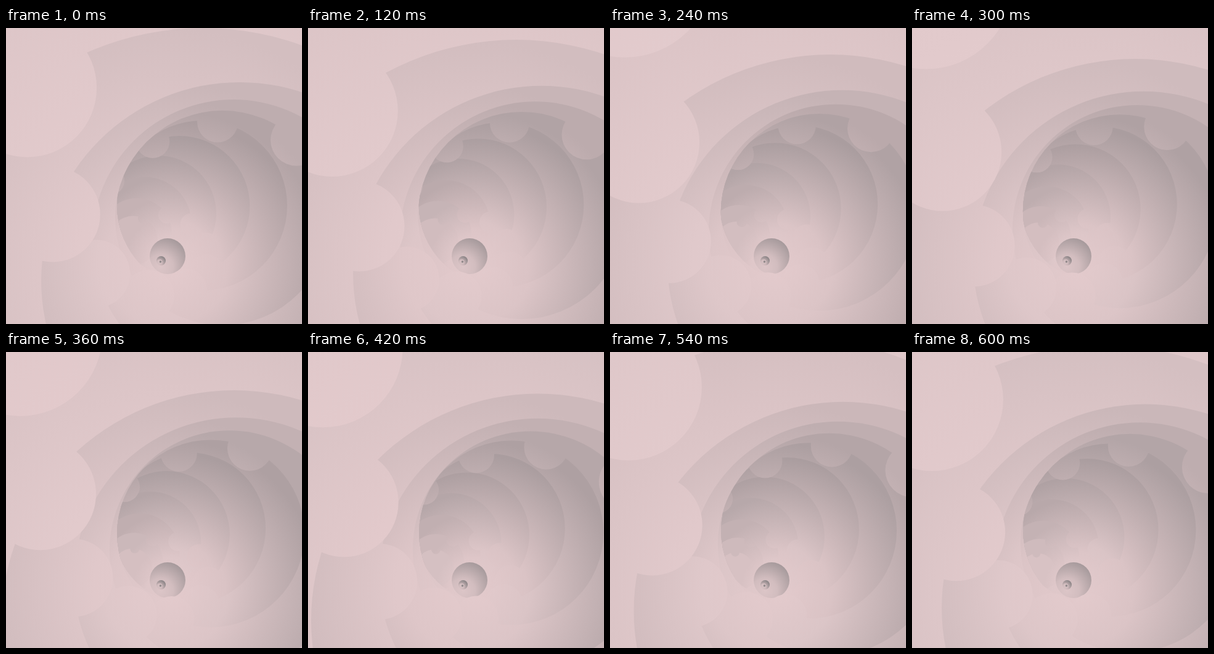
Write an HTML page with a canvas that moves like this. It is 480 by 480 pixels and loops after 0.66 s.

```html
<!DOCTYPE html>
<html>
<head>
<meta charset="utf-8">
<style>
html, body { margin: 0; height: 100%; overflow: hidden; background: #e4cbcd; }
canvas { display: block; width: 100vw; height: 100vh; }
</style>
</head>
<body>
<canvas id="stage" width="480" height="480"></canvas>
<script>
const ctx = document.getElementById('stage').getContext('2d');
const FIRST = -3, LAST = 8, LIGHT = 228;
const lamp = { x: 268, y: 380 };

// Path of the discs, every second one from FIRST: x, y, radius
const path = [
  [-180, 482, 1040], [320, 469, 469], [369, 345, 229], [318, 288, 138],
  [247, 301, 94], [212, 333, 57], [204, 355, 27]
].map(([x, y, r]) => [x, y, Math.log(r)]);

// Key points continue in a straight line past both ends
function key(i, c) {
  const end = path.length - 1;
  if (i < 0) return 2 * path[0][c] - path[1][c];
  if (i > end) return 2 * path[end][c] - path[end - 1][c];
  return path[i][c];
}

function spline(u, c) {
  const s = (u - FIRST) / 2, i = Math.floor(s), f = s - i;
  const [a, b, d, e] = [-1, 0, 1, 2].map(k => key(i + k, c));
  return b + 0.5 * f * (d - a + f * (2 * a - 5 * b + 4 * d - e + f * (3 * (b - d) + e - a)));
}

function discAt(u) {
  return {
    x: spline(u, 0),
    y: spline(u, 1),
    r: Math.exp(spline(u, 2)),
    turn: (199.5 - 33 * u) * Math.PI / 180,
    rim: LIGHT - 58 * Math.exp(-(((u - 3.7) / 4.2) ** 2))
  };
}

const tone = g => `rgb(${g},${0.8 * g + 21},${0.8 * g + 23})`;

function glow(x, y, r, inner, outer) {
  const g = ctx.createRadialGradient(x, y, 0, x, y, r);
  g.addColorStop(0, tone(inner));
  g.addColorStop(0.4, tone(inner + 0.18 * (outer - inner)));
  g.addColorStop(1, tone(outer));
  return g;
}

// Limits drawing to a disc with two opposite round bites taken from its rim
function clipDisc({ x, y, r, turn }) {
  ctx.beginPath();
  ctx.arc(x, y, r, 0, 7);
  ctx.clip();
  ctx.beginPath();
  ctx.rect(-3000, -3000, 6000, 6000);
  for (const a of [turn, turn + Math.PI]) {
    const bx = x + r * Math.cos(a), by = y + r * Math.sin(a), br = 0.24 * r;
    ctx.moveTo(bx + br, by);
    ctx.arc(bx, by, br, 0, 2 * Math.PI);
  }
  ctx.clip('evenodd');
}

function ball(x, y, r, fill) {
  ctx.fillStyle = fill;
  ctx.beginPath();
  ctx.arc(x, y, r, 0, 7);
  ctx.fill();
}

function drawCore() {
  ball(262, 370, 29, glow(251, 387, 50, 220, 164));
  ball(251.5, 377.5, 7.5, glow(248, 382, 13, 215, 135));
  ball(249.3, 379.3, 4, tone(212));
  ball(250.5, 379, 1.8, tone(145));
}

// Fourteen poses make a loop; every fourth is skipped
function phase(now) {
  const step = Math.floor(now % 660 / 60);
  return Math.floor(step * 4 / 3) / 14;
}

function draw(now) {
  const p = phase(now);
  ctx.save();
  for (let n = FIRST; n <= LAST; n++) {
    const d = discAt(n + p);
    clipDisc(d);
    ctx.fillStyle = glow(lamp.x, lamp.y, lamp.y - d.y + d.r, LIGHT, d.rim);
    ctx.fillRect(0, 0, 480, 480);
  }
  ctx.restore();

  ctx.save();
  for (let n = 0; n < 4; n++) clipDisc(discAt(n + p));
  drawCore();
  ctx.restore();
  requestAnimationFrame(draw);
}
requestAnimationFrame(draw);
</script>
</body>
</html>
```
